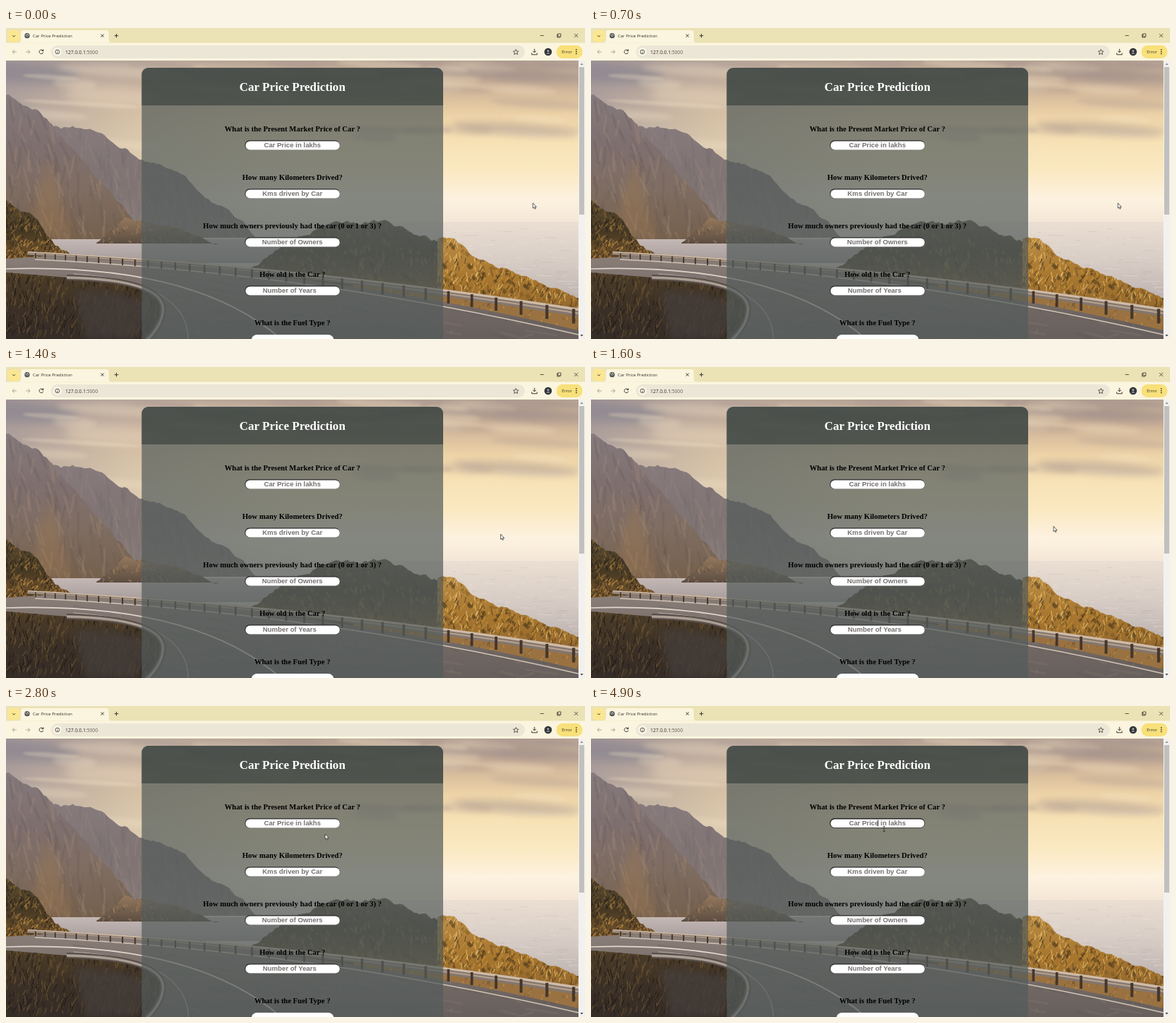
Animation of 800x430 px, one loop 5000 ms. Source, as an HTML page with a canvas:

```html
<!DOCTYPE html>
<html lang="en">
<head>
<meta charset="utf-8">
<title>Car Price Prediction</title>
<style>
html, body { margin: 0; width: 100%; height: 100%; overflow: hidden; background: #fbf5df; }
canvas, svg { position: absolute; left: 0; top: 0; width: 800px; height: 430px; }
.ui { font-family: "Open Sans", "Noto Sans", sans-serif; fill: #33302a; }
.label { font: bold 10.42px "Liberation Serif", Times, serif; text-anchor: middle; }
.hint { font: bold 9.375px "Liberation Sans", Arial, sans-serif; text-anchor: middle; fill: #757170; white-space: pre; }
.icon { fill: none; stroke: #3c3930; }
.thin { stroke-width: .8; }
.off { stroke: #aaa594; }
</style>
</head>
<body>
<canvas id="scene" width="800" height="430"></canvas>
<svg viewBox="0 0 800 430">
  <!-- form card -->
  <rect x="187.5" y="55" width="416.5" height="400" rx="9" fill="#545c5b" fill-opacity=".71"/>
  <path d="M187.5 107V64a9 9 0 0 1 9-9H595a9 9 0 0 1 9 9V107Z" fill="#323b37" fill-opacity=".6"/>
  <text class="label" x="395.7" y="87" style="font-size:16.67px" fill="#fff">Car Price Prediction</text>
  <g id="form"></g>
  <rect x="339" y="424" width="114" height="20" rx="8" fill="#fff"/>
  <g id="focus" fill="none" stroke="#1c1c1c">
    <rect x="330.4" y="155.7" width="130.6" height="12.8" rx="6.4" stroke-width=".7"/>
    <path d="M396.5 157.500v9" stroke-width=".9"/>
  </g>

  <!-- scrollbar -->
  <rect x="791" y="45" width="9" height="385" fill="#f2f1ef"/>
  <rect x="792" y="54" width="7" height="204" fill="#c1c0be"/>
  <path d="M793.5 51l2-2.500 2 2.500Z" fill="#888"/>
  <path d="M793.5 424l2 2.500 2-2.500Z" fill="#444"/>

  <!-- browser -->
  <g class="ui">
    <rect width="800" height="21" fill="#ebe2b5"/>
    <rect y="20.5" width="800" height="24.5" fill="#fbf5df"/>
    <path d="M16 20.5q4.500 0 4.500-4V7q0-4 4-4H138q4 0 4 4v9.500q0 4 4 4Z" fill="#fbf5df"/>
    <rect x="2.5" y="3" width="16.5" height="16.5" rx="5" fill="#fbe791"/>
    <path class="icon" d="M9 10.300l1.800 1.800 1.800-1.800"/>
    <circle cx="29.2" cy="10.7" r="3.6" fill="#55585c"/>
    <path d="M26.5 9.500l2 .8 1 1.700M30 7.800l-.6 1.500 2.300 1" fill="none" stroke="#e8e4d4" stroke-width=".8"/>
    <text x="37" y="13" font-size="6">Car Price Prediction</text>
    <path class="icon" d="M131.2 8.600l4 4m0-4l-4 4M149.800 10.700h5.400m-2.700-2.700v5.400"/>
    <path class="icon thin" d="M738 10.500h5.200M762.800 8.800h-1.300v4.200h4.200v-1.300M762.800 8h3.800v3.800h-3.800ZM785.300 8l5 5m0-5l-5 5"/>
    <path id="back" class="icon off" d="M14.5 33H8.800m2.700-2.700L8.800 33l2.700 2.700"/>
    <use href="#back" transform="matrix(-1 0 0 1 42 0)"/>
    <path class="icon" d="M51 31.200a2.800 2.800 0 1 0 .5 2.400M51.500 29.600v2.100h-2.100"/>
    <rect x="62" y="24" width="655" height="18" rx="9" fill="#ece6d7"/>
    <circle cx="71" cy="33" r="5.8" fill="#fbf7e8"/>
    <circle class="icon thin" cx="71" cy="33" r="2.9"/>
    <path class="icon thin" d="M71 31.200v.8m0 .8v2.200"/>
    <text x="82" y="35.5" font-size="6.64">127.0.0.1<tspan fill="#625e54">:5000</tspan></text>
    <path class="icon thin" d="M704.5 29.500l1.100 2.500 2.600.2-2 1.800.6 2.600-2.300-1.400-2.300 1.400.6-2.600-2-1.800 2.600-.2Z"/>
    <path class="icon" d="M730.2 28.800v5m-2.200-2l2.200 2.200 2.200-2.200M726.500 34.500v2.300h7.400v-2.300"/>
    <circle cx="749" cy="33" r="5.2" fill="#34373b"/>
    <circle cx="749" cy="31.8" r="1.3" fill="#b9babb"/>
    <path d="M746.5 35.500q2.500-3 5 0Z" fill="#b9babb"/>
    <rect x="760.5" y="24" width="36" height="18" rx="8.5" fill="#f8e07a"/>
    <text x="768" y="35.2" font-size="6">Error</text>
    <path d="M788 29.300v7" stroke="#33302a" stroke-width="1.5" stroke-dasharray="1.5 1.25"/>
  </g>

  <path id="arrow" d="M0 0V7.200L1.600 5.800 2.700 8.200 3.800 7.700 2.800 5.400H4.900Z" fill="#fff" stroke="#222" stroke-width=".7"/>
  <path id="beam" d="M-1.500-3.500h3M0-3.500v7M-1.500 3.500h3" fill="none" stroke="#222" stroke-width=".7"/>
</svg>
<script>
const $ = id => document.getElementById(id);
const g = $('scene').getContext('2d');

let seed = 7;
const rnd = () => (seed = seed * 16807 % 2147483647) / 2147483647;
const mix = (a, b, k) => a + (b - a) * k;

// Linear interpolation through [x, ...values] keys
function along(keys, x) {
  const i = Math.max(1, keys.findIndex(k => k[0] >= x)), a = keys[i - 1], b = keys[i];
  return a.slice(1).map((v, j) => mix(v, b[j + 1], (x - a[0]) / (b[0] - a[0])));
}
function down(y0, y1, ...colors) {
  const f = g.createLinearGradient(0, y0, 0, y1);
  colors.forEach((c, i) => f.addColorStop(i / (colors.length - 1), c));
  return f;
}
function soft(blur, paint) {
  g.filter = `blur(${blur}px)`;
  paint();
  g.filter = 'none';
}
function shape(path, fill) {
  g.fillStyle = fill;
  g.fill(new Path2D(path));
}
function line(path, color, width) {
  g.strokeStyle = color;
  g.lineWidth = width;
  g.stroke(new Path2D(path));
}
function cloud(x, y, rx, ry, color) {
  g.fillStyle = color;
  soft(ry / 2, () => {
    g.beginPath();
    g.ellipse(x, y, rx, ry, .06, 0, 7);
    g.fill();
  });
}
// Rough skyline through a few keys, closed at the base
function ridge(keys, rough, base) {
  const path = new Path2D(), from = keys[0][0], to = keys.at(-1)[0];
  let n = 0;
  path.moveTo(from, base);
  for (let x = from; x <= to; x += 4) {
    n = n * .7 + (rnd() - .5) * rough;
    path.lineTo(x, along(keys, x)[0] + n);
  }
  path.lineTo(to, base);
  return path;
}
// Short random strokes kept inside a shape
function strokes(path, x, y, w, h, n, dx, dy, width, ...colors) {
  g.save();
  g.clip(new Path2D(path));
  for (let i = 0; i < n; i++) {
    const k = .4 + rnd();
    line(`M${x + rnd() * w} ${y + rnd() * h}l${dx * k * (rnd() - .3)} ${dy * k}`, colors[i % colors.length], width);
  }
  g.restore();
}

function paintSky() {
  g.fillStyle = down(45, 275, '#b5a294', '#d0b599', '#edd3a7', '#f7e2b6', '#fbe9c2', '#fdf2e0', '#f3e4d4');
  g.fillRect(0, 45, 800, 385);
  const haze = g.createLinearGradient(0, 0, 420, 0);
  haze.addColorStop(0, '#a0969bcc');
  haze.addColorStop(1, '#dcc8b000');
  g.fillStyle = haze;
  g.fillRect(0, 45, 420, 250);
  cloud(20, 62, 80, 14, '#8d8790cc');
  cloud(150, 95, 70, 14, '#e2ccb4aa');
  cloud(400, 70, 150, 12, '#a5958a88');
  cloud(690, 62, 110, 10, '#a8978a99');
  for (let i = 0; i < 44; i++)
    cloud(rnd() * 800, 48 + rnd() ** 2 * 120, 30 + rnd() * 60, 3 + rnd() * 5, i % 2 ? '#f6e3c84d' : '#a6948e44');
}

function paintLand() {
  g.fillStyle = down(268, 390, '#ebdfd3', '#d5cac3', '#b5aba8');
  g.fillRect(0, 268, 800, 162);
  strokes('M604 270H791V375H604Z', 600, 274, 200, 100, 160, 30, .3, 1, '#f6ebe055', '#a59d9a33');

  const far = ridge([[60, 140], [111, 136], [187, 180], [240, 203], [350, 290]], 5, 290);
  shape(far, down(135, 290, '#867a7c', '#7f7373', '#8a7e7a'));
  strokes(far, 60, 130, 270, 160, 240, 18, 25, 3, '#6a5f6028', '#a8948726');
  const near = ridge([[0, 92], [47, 117], [96, 169], [198, 292]], 5, 292);
  shape(near, down(92, 292, '#867a7d', '#7f7070', '#7f6d62', '#75604c'));
  strokes(near, 0, 90, 190, 200, 260, 22, 28, 3, '#5c515030', '#ab927a38', '#6d605d2a');
  soft(6, () => shape('M30 291L58 182 92 291Z', '#a07c5466'));

  g.fillStyle = down(292, 325, '#c4b8b4', '#a39a9a');
  g.fillRect(0, 292, 430, 33);
  const head = ridge([[125, 296], [165, 266], [220, 273], [293, 297]], 4, 298);
  shape(head, down(262, 298, '#94785c', '#5c4d42'));
  strokes(head, 125, 262, 170, 35, 130, 8, 4, 1.5, '#b08e6677', '#443c3866');

  const hill = ridge([[340, 332], [385, 298], [440, 274], [520, 266], [604, 298]], 5, 370);
  shape(hill, down(265, 360, '#5a5040', '#483d2c', '#6b5230'));
  strokes(hill, 345, 262, 260, 95, 300, 8, 7, 3, '#2f2e2655', '#8a704466');

  const slope = ridge([[596, 290], [620, 290], [645, 316], [703, 340], [792, 374]], 4, 405);
  shape(slope, down(290, 400, '#b88a44', '#a8772f', '#8f652e'));
  strokes(slope, 590, 285, 202, 110, 130, 12, 6, 5, '#3f311b77', '#6b4d2266');
  strokes(slope, 590, 285, 202, 110, 600, 9, -7, 1.1, '#f0cd7caa', '#3f301c99', '#cd983faa');

  const bush = ridge([[0, 237], [40, 262], [68, 302], [112, 321]], 6, 325);
  shape(bush, down(237, 325, '#55482f', '#453824', '#7d5a2c'));
  strokes(bush, 0, 235, 100, 90, 420, 9, -6, 1.6, '#9a7438aa', '#2a221baa', '#6a522d99');
  strokes(bush, 0, 296, 110, 28, 130, 9, -4, 1.3, '#d39a4daa', '#3a2c1eaa');
}

const railY = x => 307.5 + .048 * x + 6.75e-5 * x * x;

function paintRoad() {
  const road = 'M0 319L60 315Q420 336 791 410V430H0Z';
  shape(road, down(315, 430, '#8a7e78', '#756b67', '#675f5c'));
  strokes(road, 0, 320, 790, 110, 200, 90, 8, 3, '#98897f26', '#504a4822');
  const verge = 'M480 350L791 392V418Q640 382 480 358Z';
  shape(verge, '#9a7241');
  strokes(verge, 480, 350, 311, 70, 320, 8, -5, 1, '#d6a65aaa', '#5d472a99');
  line('M40 320Q420 338 791 424', '#d0c3b6', 1.3);
  line('M0 333Q260 325 380 430', '#e0d5ca', 1.7);
  line('M93 340Q250 350 252 430', '#b5aaa2', 1.2);

  for (let x = 30; x < 791; x += 2) {
    const size = 4.5 + x / 110;
    [['#83766e', 0, 1], ['#d0bba5', 0, .3], ['#b5a08d', .5, .2]].forEach(([color, top, part]) => {
      g.fillStyle = color;
      g.fillRect(x, railY(x) + top * size, 2, part * size);
    });
  }
  for (let x = 40; x < 791; x += 12 + x / 30) {
    g.fillStyle = '#44362b';
    g.fillRect(x, railY(x) + 2, 1.5 + x / 300, 6 + x / 55);
  }

  // inner bank with its curved rail
  const bend = 'M84 345Q217 348 217 389Q216 411 194 432';
  const bank = 'M0 338L84 345Q217 348 217 389Q216 411 194 432H0Z';
  shape(bank, down(338, 430, '#4c3d28', '#3b3026', '#352c27'));
  strokes(bank, 0, 338, 215, 92, 560, 9, -9, 1.2, '#765b34aa', '#211a18bb', '#54432b99');
  soft(5, () => shape('M95 362Q195 365 198 392L178 430H110Z', '#453e3acc'));
  line(bend, '#564d48', 8);
  line(bend, '#9a8e85', 4);
  line(bend, '#c0b1a3', 1.2);
}

paintSky();
paintLand();
paintRoad();

const fields = [
  ['What is the Present Market Price of Car ?', 'Car Price in lakhs'],
  ['How many Kilometers Drived?', 'Kms driven by Car'],
  ['How much owners previously had the car (0 or 1 or 3) ?', 'Number of Owners'],
  ['How old is the Car ?', 'Number of Years\u00a0\u00a0\u00a0'],
  ['What is the Fuel Type ?']
];
$('form').innerHTML = fields.map(([label, hint], i) => `<g transform="translate(0 ${67 * i})">
  <text class="label" x="395.7" y="143">${label}</text>` + (hint ? `
  <rect x="330" y="155.3" width="131" height="13.3" rx="6.6" fill="#2c2c2c"/>
  <rect x="331" y="156.4" width="130" height="12" rx="6" fill="#fff"/>
  <text class="hint" x="395.7" y="165.3">${hint}</text>` : '') + '</g>').join('');

// pointer path: time, x, y
const path = [[0, 728, 242], [1200, 728, 242], [2100, 528, 193], [2300, 528, 193],
  [2800, 441, 177], [3800, 410, 173], [4500, 405, 170], [5000, 405, 170]];
const show = (id, on) => $(id).style.display = on ? '' : 'none';

function draw() {
  const t = Math.floor(performance.now() % 5000 / 100) * 100;
  const [x, y] = along(path, t);
  for (const id of ['arrow', 'beam']) $(id).setAttribute('transform', `translate(${x} ${y})`);
  show('arrow', t < 3400);
  show('beam', t >= 3400);
  show('focus', t >= 4900);
  requestAnimationFrame(draw);
}
draw();
</script>
</body>
</html>
```
